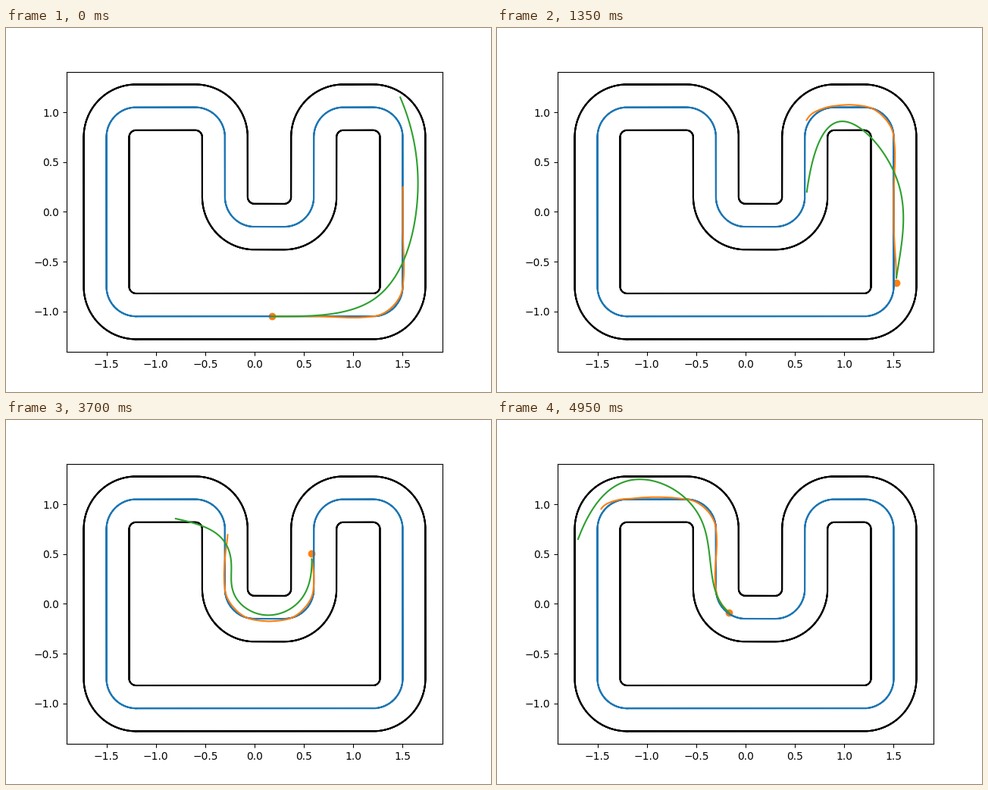
A matplotlib script for the animation above (5000 ms loop, 640 by 480 pixels).

```python
import numpy as np
import matplotlib.pyplot as plt
from matplotlib.animation import FuncAnimation

FRAMES, INTERVAL = 100, 50
RADIUS, HALF_WIDTH = 0.3, 0.23
HORIZON = 2.8
ARC = RADIUS * np.pi / 2

# Track: straights alternating with quarter turns (+1 left, -1 right).
STRAIGHTS = [2.4, 1.5, 0.3, 0.6, 0.3, 0.6, 0.6, 1.5]
TURNS = [1, 1, 1, -1, -1, 1, 1, 1]
lengths = np.ravel([(s, ARC) for s in STRAIGHTS])
angles = np.ravel([(0, t * np.pi / 2) for t in TURNS])
knots = np.concatenate([[0], np.cumsum(lengths)]) - STRAIGHTS[0]
headings = np.concatenate([[0], np.cumsum(angles)])


def heading(s):
    return np.interp(s, knots, headings)


grid = np.linspace(knots[0], knots[-1], 6001)
mid = heading((grid[1:] + grid[:-1]) / 2)
step = grid[1] - grid[0]
track_x = -1.2 + step * np.concatenate([[0], np.cumsum(np.cos(mid))])
track_y = -1.05 + step * np.concatenate([[0], np.cumsum(np.sin(mid))])


def center(s):
    return np.stack([np.interp(s, grid, track_x), np.interp(s, grid, track_y)], -1)


def beside(s, e):
    """Point of the track moved by e to the right of the travel direction."""
    h = heading(s)
    return center(s) + np.stack([np.sin(h) * e, -np.cos(h) * e], -1)


def bend(s, w):
    """Smoothed curvature, up to +-1 inside a turn."""
    return (heading(s + w) - heading(s - w)) / (2 * w) * RADIUS


def soft_center(s, w=0.4):
    return np.mean([center(s + d) for d in np.linspace(-w, w, 9)], axis=0)


# Distance along the track of the car and of the end of its plan.
TIMES = [0, 18, 27, 33, 47, 61, 84, 99]
CAR = [-1.02, 0.04, 0.51, 0.80, 1.96, 2.73, 4.02, 4.77]
PLAN_END = [1.47, 2.36, 3.05, 3.39, 4.17, 4.95, 6.10, 7.0]


def car_s(f):
    return np.interp(f, TIMES, CAR)


def car_at(f):
    """The car cuts into each turn and drifts wide after it."""
    s = car_s(f)
    return beside(s, 0.04 * bend(s - 0.3, 0.25) - 0.03 * bend(s, 0.25))


def lead(f):
    """Time at which the drawn paths begin: one step ahead of the car."""
    return f + min(f, 1)


def plan(f):
    """Track centre, wide before and after each turn and at the loose end."""
    s0 = car_s(lead(f))
    s = np.linspace(s0, np.interp(f, TIMES, PLAN_END), 120)
    e = 0.013 * (bend(s - 0.4, 0.15) + bend(s + 0.4, 0.15)) - 0.018 * bend(s, 0.15)
    e += 0.055 * np.exp(-((s[-1] - s) / 0.2) ** 2) * bend(s, 0.25)
    p = beside(s, e)
    return p + (car_at(lead(f)) - p[0]) * np.exp(-(s - s0) / 0.2)[:, None]


# Predicted path: points at one third, two thirds and the end of its length.
PREDICTIONS = {
    0: [(1.22, -0.87), (1.645, 0.08), (1.475, 1.15)],
    11: [(1.57, -0.42), (1.63, 0.53), (1.08, 1.33)],
    18: [(1.697, 0.0), (1.345, 1.05), (0.46, 1.697)],
    27: [(1.555, 0.26), (1.015, 0.906), (0.62, 0.2)],
    37: [(1.38, 0.93), (0.56, 0.95), (0.3, 0.02)],
    47: [(0.72, 1.16), (0.477, 0.3), (0.553, -0.66)],
    61: [(0.56, 0.32), (0.285, -0.475), (-0.5, -0.713)],
    80: [(-0.1, -0.04), (-0.42, 0.78), (-1.05, 1.39)],
    84: [(-0.245, 0.24), (-0.735, 1.01), (-1.642, 1.085)],
    90: [(-0.35, 0.5), (-0.95, 1.17), (-1.82, 0.88)],
    99: [(-0.43, 0.8), (-1.1, 1.25), (-1.696, 0.65)],
}
U = np.linspace(0, 1, 91)


def curve(points, direction):
    """Even cubic spline leaving its first point along the given direction."""
    p = np.array(points)
    h = 1 / (len(p) - 1)
    chords = np.diff(p, axis=0)
    start = direction * 1.03 * np.hypot(*chords.T).sum()
    a = np.array([[2, 1, 0, 0], [1, 4, 1, 0], [0, 1, 4, 1], [0, 0, -1, 1]])
    b = np.vstack([chords[0] - start * h, np.diff(chords, axis=0), [[0, 0]]])
    m = np.linalg.solve(a, 6 * b)
    i = np.minimum((U / h).astype(int), len(p) - 2)
    t = (U / h - i)[:, None]
    r = 1 - t
    return p[i] * r + p[i + 1] * t + (m[i] * (r**3 - r) + m[i + 1] * (t**3 - t)) / 6


def soft_path(f):
    return soft_center(car_s(lead(f)) + HORIZON * U)


def deviation(f):
    """Offset of a predicted path from the softened track ahead."""
    s = car_s(lead(f))
    ahead = soft_center(s + 0.02, 0.3) - soft_center(s - 0.02, 0.3)
    points = [car_at(lead(f)), *PREDICTIONS[f]]
    return curve(points, ahead / np.hypot(*ahead)) - soft_path(f)


KEYS = list(PREDICTIONS)
deviations = [deviation(k) for k in KEYS]


def prediction(f):
    i = min(np.searchsorted(KEYS, f, side="right"), len(KEYS) - 1)
    w = (f - KEYS[i - 1]) / (KEYS[i] - KEYS[i - 1])
    p = soft_path(f) + (1 - w) * deviations[i - 1] + w * deviations[i]
    return p + (car_at(lead(f)) - p[0]) * (1 - U[:, None]) ** 4


def draw_laps(points, color):
    """Two laps in one line give the track its heavier edge."""
    ax.plot(*np.tile(points, (2, 1)).T, color=color)


fig, ax = plt.subplots(figsize=(6.4, 4.8), dpi=100)
draw_laps(center(grid), "C0")
for side in (-HALF_WIDTH, HALF_WIDTH):
    draw_laps(beside(grid, side), "black")
car = ax.scatter([0], [0], color="C1", zorder=1)
plan_line, = ax.plot([], [], color="C1")
pred_line, = ax.plot([], [], color="C2")


def limits(values, bound):
    """Data range with the usual five percent margin."""
    lo, hi = min(-bound, values.min()), max(bound, values.max())
    pad = 0.05 * (hi - lo)
    return lo - pad, hi + pad


def update(f):
    orange, green = plan(f), prediction(f)
    car.set_offsets([car_at(f)])
    plan_line.set_data(*orange.T)
    pred_line.set_data(*green.T)
    x, y = np.concatenate([orange, green]).T
    ax.set_xlim(*limits(x, 1.5 + HALF_WIDTH))
    ax.set_ylim(*limits(y, 1.05 + HALF_WIDTH))
    return car, plan_line, pred_line


anim = FuncAnimation(fig, update, frames=FRAMES, interval=INTERVAL,
                     repeat=True, repeat_delay=0, blit=False)
plt.show()
```
